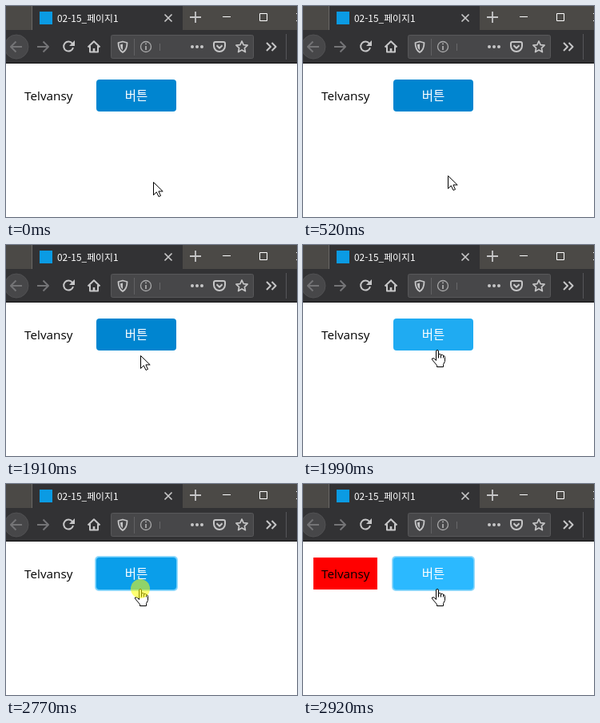
An HTML page for the animation above (5.78 s loop, 364 px wide and 264 px high).

```html
<!DOCTYPE html>
<html lang="ko">
<head>
<meta charset="utf-8">
<title>Button demo</title>
<style>
  html, body { margin: 0; width: 100%; height: 100%; overflow: hidden; background: #fff; }
  svg { display: block; width: 100%; height: 100%; }
  text { font-family: "Open Sans", "Noto Sans CJK KR", "Noto Sans CJK", sans-serif; }
  .ko { font-family: "Noto Sans CJK KR", "Noto Sans CJK", sans-serif; }
  .icon { fill: none; stroke: #c6c6c7; stroke-width: 2; stroke-linejoin: round; }
  .solid { fill: #c6c6c7; stroke: none; }
  .dim { stroke: #747476; }
  .pointer { fill: #fff; stroke: #000; stroke-linejoin: round; }
</style>
</head>
<body>
<svg viewBox="0 0 364 264">
  <!-- browser frame -->
  <rect width="364" height="31" fill="#4b4946"/>
  <rect y="30" width="364" height="41" fill="#323234"/>
  <rect x="32" width="1" height="30" fill="#6a6865"/>
  <rect x="33" width="188" height="31" fill="#323234"/>
  <rect y="71" width="364" height="1" fill="#0c0c0d"/>
  <rect x="42" y="7" width="16" height="16" fill="#0b9be3"/>
  <text class="ko" x="64" y="19.5" font-size="11.900" fill="#fff">02-15_페이지1</text>
  <g class="icon">
    <path d="M198.500 10.500l9 9m0-9l-9 9" stroke-width="1.700"/>
    <path d="M230 14h14m-7-7v14" stroke-width="1.800"/>
    <path d="M271 13.500h10M317.500 9.500h9v9h-9zM363 9l10 10m0-10l-10 10" stroke="#fff" stroke-width="1" stroke-linejoin="miter"/>
  </g>

  <!-- toolbar -->
  <circle cx="13" cy="51" r="15" fill="#474749" stroke="#515153"/>
  <rect x="131.500" y="36.500" width="178" height="29" rx="2" fill="#474749" stroke="#58585a"/>
  <path d="M160.500 41v21" stroke="#626264"/>
  <path d="M192.500 47v9" stroke="#68686a"/>
  <path d="M350.500 35v32" stroke="#56565a"/>
  <g class="icon">
    <path class="dim" d="M20 51H6m6.500-6.500L6 51l6.500 6.500"/>
    <path class="dim" d="M39 51h14m-6.500-6.500L53 51l-6.500 6.500"/>
    <path d="M83 47a6 6 0 1 0 1 5"/>
    <path class="solid" d="M86 43v7h-7z"/>
    <path d="M102.500 51.500l7.500-7.300 7.500 7.300M105 50v7.500h10V50"/>
    <path d="M110 58v-5" stroke-width="2.600"/>
    <path d="M146 44.500l5.500 1.500c0 6-1 9.500-5.500 12-4.500-2.500-5.500-6-5.500-12z" stroke-width="1.800"/>
    <path class="solid" d="M146 47.500l-3 .8c0 3 .5 5 3 7z"/>
    <circle cx="175" cy="51" r="6.500" stroke="#a9a9aa" stroke-width="1.300"/>
    <path d="M175 50v5m0-8.500v1.800" stroke="#b4b4b5" stroke-width="1.600"/>
    <path d="M262 45h10q2 0 2 2v3a7 7 0 0 1-14 0v-3q0-2 2-2zM263.500 49.300l3.500 3.500 3.500-3.500"/>
    <path d="M295 44l2.100 4.600 5 .6-3.700 3.400 1 5-4.400-2.500-4.400 2.500 1-5-3.700-3.400 5-.6z" stroke-width="1.700"/>
    <path d="M326 46l5 5-5 5m6.500-10l5 5-5 5"/>
    <g class="solid">
      <circle cx="233" cy="51" r="2"/><circle cx="239" cy="51" r="2"/><circle cx="245" cy="51" r="2"/>
    </g>
  </g>

  <!-- page -->
  <rect id="highlight" x="13" y="92" width="80" height="40" fill="#f00"/>
  <text x="53.300" y="118" font-size="15.300" text-anchor="middle">Telvansy</text>
  <g id="ring">
    <rect x="111" y="90" width="104" height="44" rx="5" fill="#9bdcfc"/>
    <rect x="112" y="91" width="102" height="42" rx="4.500" fill="#6bcdfb"/>
  </g>
  <rect id="button" x="113" y="92" width="100" height="40" rx="4"/>
  <text class="ko" x="163" y="118" font-size="15.500" text-anchor="middle" fill="#fff">버튼</text>

  <path id="arrow" class="pointer" d="M.5.5v16l3.800-3.700 2.700 5.700 2.500-1.100-2.600-5.500h5.300z"/>
  <g id="hand" class="pointer">
    <path d="M5.500 13.500V2q0-1.500 1.500-1.500T8.500 2v3.500h2q1 0 1 1h2q1 0 1 1h.5q1.500.5 1.500 2v5l-2 4v3h-8v-2l-6-7V11q2.500-1.500 5 2.500z"/>
    <path d="M8.500 5.500v5m3-4v4m3-3v3" fill="none"/>
  </g>
  <circle id="click" cx="168" cy="131" r="12" fill="#ff0" fill-opacity=".55"/>
</svg>
<script>
const LOOP = 5780;
const el = id => document.getElementById(id);
const [highlight, ring, button, arrow, hand, click] =
  ["highlight", "ring", "button", "arrow", "hand", "click"].map(el);

// Each step keeps the values it does not mention.
const steps = [
  { at: 0, x: 184, y: 220, fill: "#0085d0", over: false, down: false, focus: false, red: false },
  { at: 130, y: 219 },
  { at: 210, x: 183, y: 218 },
  { at: 360, x: 182, y: 215 },
  { at: 440, y: 213 },
  { at: 520, x: 181, y: 212 },
  { at: 1680, x: 180, y: 210 },
  { at: 1760, x: 176, y: 191 },
  { at: 1830, x: 171, y: 162 },
  { at: 1910, x: 168, y: 138 },
  { at: 1990, x: 161, y: 131, over: true, fill: "#1fabf2" },
  { at: 2690, down: true, fill: "#2bb9ff" },
  { at: 2770, focus: true, fill: "#0a9eea" },
  { at: 2830, down: false, red: true, fill: "#1dadf6" },
  { at: 2920, fill: "#2bb9ff" }
];

const show = (node, on) => node.setAttribute("visibility", on ? "visible" : "hidden");

function draw() {
  const t = performance.now() % LOOP;
  const s = Object.assign({}, ...steps.filter(step => step.at <= t));
  show(highlight, s.red);
  show(ring, s.focus);
  show(click, s.down);
  show(arrow, !s.over);
  show(hand, s.over);
  button.setAttribute("fill", s.fill);
  (s.over ? hand : arrow).setAttribute("transform", `translate(${s.x} ${s.y})`);
  requestAnimationFrame(draw);
}
draw();
</script>
</body>
</html>
```
